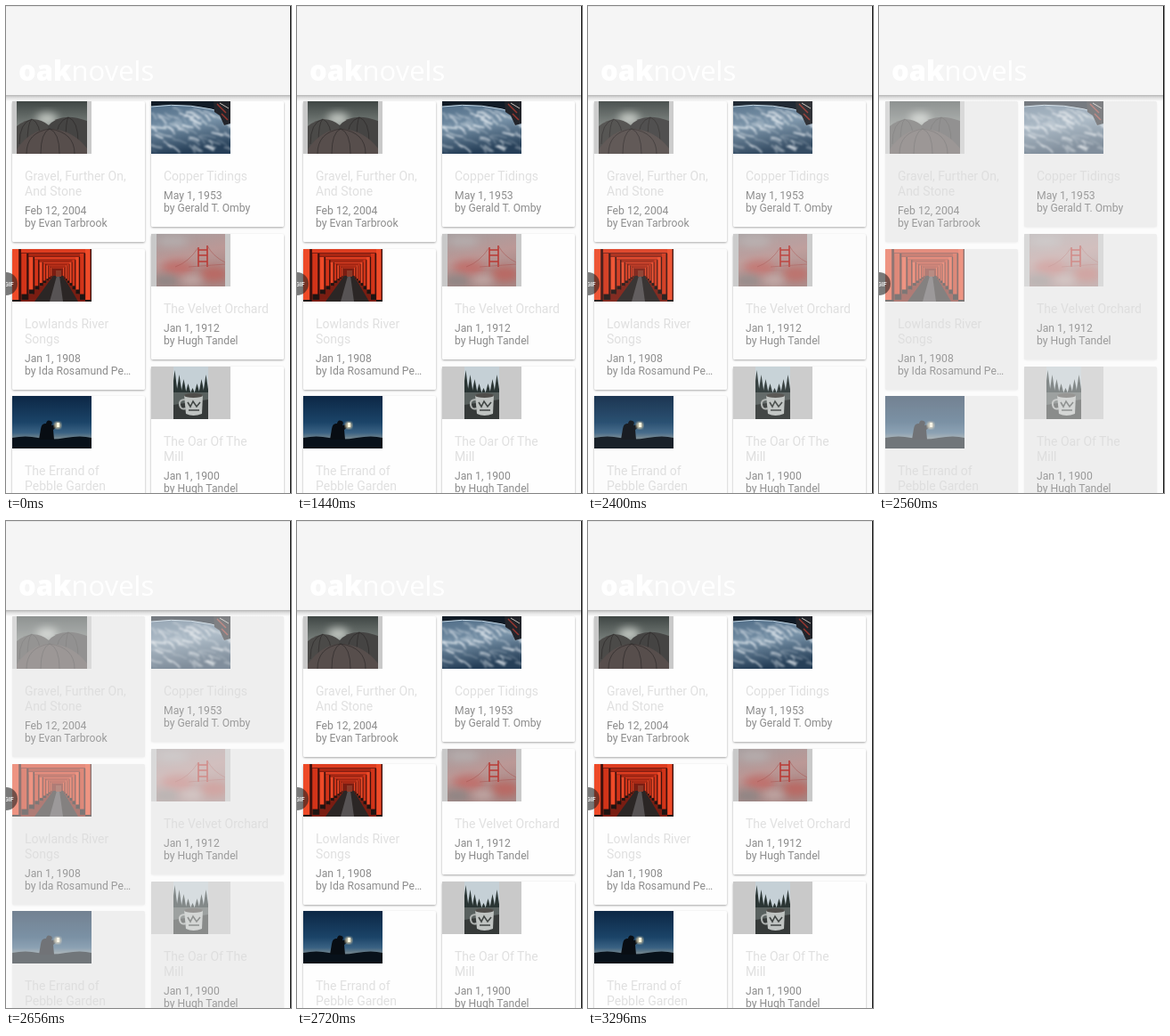
An HTML page for the animation above (3.68 s loop, 320 by 547 pixels).

```html
<!DOCTYPE html>
<html lang="en">
<head>
<meta charset="utf-8">
<title>Book list</title>
<style>
  html, body { margin: 0; width: 100%; height: 100%; overflow: hidden; background: #fcfcfc; }
  svg { display: block; }
  #stage { width: 100vw; height: 100vh; }
  text { font-family: Roboto, "Noto Sans", sans-serif; }
  .title { font-size: 14px; }
  .meta { font-size: 12.2px; }
  .logo { font: 400 31px "Open Sans", "Noto Sans", sans-serif; fill: #fff; }
  .logo tspan { font-weight: 800; }
</style>
</head>
<body>
<svg id="stage" viewBox="0 0 320 547" preserveAspectRatio="none">
  <defs>
    <filter id="cardShadow" x="-5%" y="-5%" width="110%" height="110%">
      <feGaussianBlur stdDeviation="1"/>
    </filter>
    <filter id="soft"><feGaussianBlur stdDeviation=".8"/></filter>
    <filter id="haze" x="-50%" y="-50%" width="200%" height="200%"><feGaussianBlur stdDeviation="5"/></filter>
    <linearGradient id="drop" x2="0" y2="1">
      <stop stop-color="#000" stop-opacity=".28"/>
      <stop offset=".4" stop-color="#000" stop-opacity=".12"/>
      <stop offset="1" stop-color="#000" stop-opacity="0"/>
    </linearGradient>
    <linearGradient id="dusk" x2="0" y2="1">
      <stop stop-color="#0c2745"/><stop offset=".5" stop-color="#1b4468"/>
      <stop offset=".7" stop-color="#3a6283"/><stop offset=".8" stop-color="#6f828c"/>
    </linearGradient>
    <linearGradient id="storm" x2="0" y2="1">
      <stop stop-color="#3f4644"/><stop offset=".5" stop-color="#7d8480"/>
    </linearGradient>
    <linearGradient id="ocean" x2=".2" y2="1">
      <stop stop-color="#4b6883"/><stop offset=".5" stop-color="#7690a6"/><stop offset="1" stop-color="#263f58"/>
    </linearGradient>
    <linearGradient id="fog" x2=".3" y2="1">
      <stop stop-color="#a59d9e"/><stop offset=".5" stop-color="#bb9896"/><stop offset="1" stop-color="#a58785"/>
    </linearGradient>
  </defs>
  <rect width="320" height="547" fill="#fcfcfc"/>
  <g id="cards"></g>
  <rect y="100" width="320" height="7" fill="url(#drop)"/>
  <rect width="320" height="100" fill="#f5f5f5"/>
  <rect width="320" height="1" fill="#e6e6e6"/>
  <text class="logo" x="14" y="84"><tspan>oak</tspan>novels</text>
  <circle cx="0" cy="312" r="13" fill="#222" opacity=".6"/>
  <text x="-2" y="315" font-size="7" font-weight="500" fill="#fff">GIF</text>
  <rect x="319" width="1" height="547" fill="#111"/>
</svg>
<script>
const PERIOD = 3680;

const random = seed => () => (seed = (seed * 16807) % 2147483647) / 2147483647;
const repeat = (n, draw) => Array.from({ length: n }, (_, i) => draw(i)).join('');
const rect = (x, y, w, h, fill) => `<rect x="${x}" y="${y}" width="${w}" height="${h}" fill="${fill}"/>`;
const path = (d, fill, more = '') => `<path d="${d}" fill="${fill}" ${more}/>`;
const line = (d, stroke, width = 1, more = '') =>
  path(d, 'none', `stroke="${stroke}" stroke-width="${width}" ${more}`);
const blob = (x, y, rx, ry, fill, filter = 'haze') =>
  `<ellipse cx="${x}" cy="${y}" rx="${rx}" ry="${ry}" fill="${fill}" filter="url(#${filter})"/>`;
const clipped = (x, w, content) => `<svg x="${x}" width="${w}" height="59" viewBox="${x} 0 ${w} 59">${content}</svg>`;
const grey = v => `rgb(${v},${v},${v})`;

// Each picture is drawn in an 89 x 59 box.
function umbrellas() {
  const ribs = (x, y, ends, foot) =>
    ends.map(e => line(`M${x} ${y}Q${e} ${y + 4} ${e} ${foot}`, '#292626', .6)).join('');
  return clipped(5, 79, rect(5, 0, 79, 59, 'url(#storm)') +
    blob(39, 20, 12, 7, '#c3c8c2') +
    path('M5 28Q24 13 41 27Q45 38 46 59H5Z', '#4b4a48') +
    path('M40 28Q54 11 84 22V59H43Z', '#454443') +
    ribs(22, 20, [8, 17, 32], 48) + ribs(63, 18, [49, 60, 74], 46) +
    path('M5 54Q20 32 42 31Q68 32 84 53V59H5Z', '#574e4c') +
    ribs(42, 31, [16, 32, 53, 70], 59));
}

function gates() {
  const vanish = { x: 52, y: 25 };
  const posts = repeat(9, i => {
    const s = .8 ** i;
    const top = vanish.y * (1 - s), bottom = vanish.y + 40 * s;
    const post = (x, w) => rect(x, top, w, bottom - top, i % 2 ? '#d23419' : '#ee4a28') +
      rect(x + w * .8, top, w * .3, bottom - top, '#3d110d') +
      rect(x, bottom - 8 * s, w, 8 * s, '#1f1412');
    return rect(vanish.x * (1 - s), top, 89 * s, 4 * s, i % 2 ? '#a92612' : '#dd3d20') +
      post(vanish.x * (1 - s), 9 * s) + post(vanish.x + 30 * s, 7 * s);
  });
  return rect(0, 0, 89, 59, '#7a1d12') + path('M46 30H57L74 59H25Z', '#2b2625') +
    path('M50 30H53L57 59H42Z', '#575354') + posts + rect(49, 24, 6, 7, '#8b3a29');
}

function lanternNight() {
  return rect(0, 0, 89, 59, 'url(#dusk)') +
    path('M0 47Q15 44 29 47T60 47T89 47V59H0Z', '#08111a') +
    path('M30 49L32 37Q33 30 38 31Q39 26 43 28Q46 29 44 33L51 32V34L46 38L47 49Z', '#080d13') +
    blob(51, 33, 4, 4, '#b7b39c', 'soft') + rect(50, 30, 3, 5, '#fff8df');
}

function planet() {
  const next = random(71);
  const clouds = repeat(75, () => {
    const x = next() * 100 - 12, y = 7 + next() * 46, w = 4 + next() * 14;
    return line(`M${x} ${y}q${w / 2} ${next() * 6 - 2} ${w} ${2 + next() * 7}`, '#e8eef3', .5 + next() * 2,
      `opacity="${.3 + next() * .6}"`);
  });
  return rect(0, 0, 89, 59, 'url(#ocean)') + `<g filter="url(#soft)">${clouds}</g>` +
    path('M0 0H89V15Q45 0 0 6Z', '#111b26') + line('M0 6Q45 0 89 15', '#c3d7e5', 1) +
    path('M70 0H89V25L82 27L77 16L71 12Z', '#22242a') +
    line('M74 3L84 13M79 14L86 21', '#94362f', 1.5) + line('M77 2L87 8', '#c5c0b9', 1);
}

function bridge() {
  return clipped(6, 77, rect(6, 0, 77, 59, 'url(#fog)') +
    blob(30, 38, 18, 8, '#c0706c') + blob(70, 45, 16, 9, '#b96964') + blob(16, 53, 14, 7, '#8f8584') +
    blob(46, 52, 12, 5, '#c4aaa7') + blob(24, 8, 18, 6, '#b5adad') +
    line('M53 15V37M63 13V37M53 18H63M53 24H63M53 31H63', '#b93a35', 1.6) +
    line('M53 15Q42 32 27 37M63 13Q69 25 83 32M42 37L83 34', '#a95c58', .6));
}

function mug() {
  const trees = repeat(8, i => {
    const height = 8 + Math.abs(i - 4) * 5;
    return path(`M${23 + i * 5} 32l3.5 -${height}l3.5 ${height}z`, '#2a3534');
  });
  return clipped(25, 39, rect(25, 0, 39, 59, '#c5d0d6') + trees +
    rect(25, 29, 39, 30, '#59615f') + path('M25 43L64 37V59H25Z', '#363a39') +
    path('M37 32H58L57 53Q47 57 39 53Z', '#bfc3c1') + `<ellipse cx="47.5" cy="32.5" rx="10.5" ry="2.5" fill="#4f4d4a"/>` +
    line('M38 37Q31 37 32 43T39 47', '#aeb2b0', 2) +
    line('M41 40L44 45L47 39L51 45L55 40M42 49H54', '#414644', 1.6));
}

const books = [
  { x: 7, y: 107, art: umbrellas, title: ['Gravel, Further On,', 'And Stone'], date: 'Feb 12, 2004', author: 'Evan Tarbrook' },
  { x: 7, y: 273, art: gates, title: ['Lowlands River', 'Songs'], date: 'Jan 1, 1908', author: 'Ida Rosamund Pe…' },
  { x: 7, y: 438, art: lanternNight, title: ['The Errand of', 'Pebble Garden'], date: 'Jan 1, 1820', author: 'Orin Maltby' },
  { x: 163, y: 107, art: planet, title: ['Copper Tidings'], date: 'May 1, 1953', author: 'Gerald T. Omby' },
  { x: 163, y: 256, art: bridge, title: ['The Velvet Orchard'], date: 'Jan 1, 1912', author: 'Hugh Tandel' },
  { x: 163, y: 405, art: mug, title: ['The Oar Of The', 'Mill'], date: 'Jan 1, 1900', author: 'Hugh Tandel' },
];

function card({ x, y, art, title, date, author }) {
  const extra = (title.length - 1) * 17;
  const height = 141 + extra;
  const label = (kind, top, value) => `<text class="${kind}" x="14" y="${top}">${value}</text>`;
  return `<g transform="translate(${x} ${y})">
    <rect class="shadow" y="1" width="149" height="${height}" rx="2" filter="url(#cardShadow)"/>
    <rect class="face" width="149" height="${height}" rx="1.5"/>
    <svg class="photo" width="89" height="59" viewBox="0 0 89 59">${rect(0, 0, 89, 59, '#c9c9c9')}${art()}</svg>
    ${title.map((t, i) => label('title', 88.5 + i * 17, t)).join('')}
    ${label('meta', 109.5 + extra, date)}${label('meta', 124 + extra, 'by ' + author)}
  </g>`;
}

const cards = document.getElementById('cards');
cards.innerHTML = books.map(card).join('');

const looks = [
  { until: 2400, photo: 1, face: 254, title: 224, meta: 140, shadow: .34 },
  { until: 2560, photo: .93, face: 252, title: 223, meta: 143, shadow: .32 },
  { until: 2720, photo: .54, face: 238, title: 222, meta: 155, shadow: .06 },
];

function style(kind, name, value) {
  for (const node of cards.querySelectorAll('.' + kind)) node.setAttribute(name, value);
}

let shown;
function render(time) {
  const look = looks.find(l => time % PERIOD < l.until) || looks[0];
  if (look === shown) return;
  shown = look;
  style('photo', 'opacity', look.photo);
  style('shadow', 'opacity', look.shadow);
  for (const kind of ['face', 'title', 'meta']) style(kind, 'fill', grey(look[kind]));
}

const start = performance.now();
function tick() {
  render(performance.now() - start);
  requestAnimationFrame(tick);
}
tick();
</script>
</body>
</html>
```
